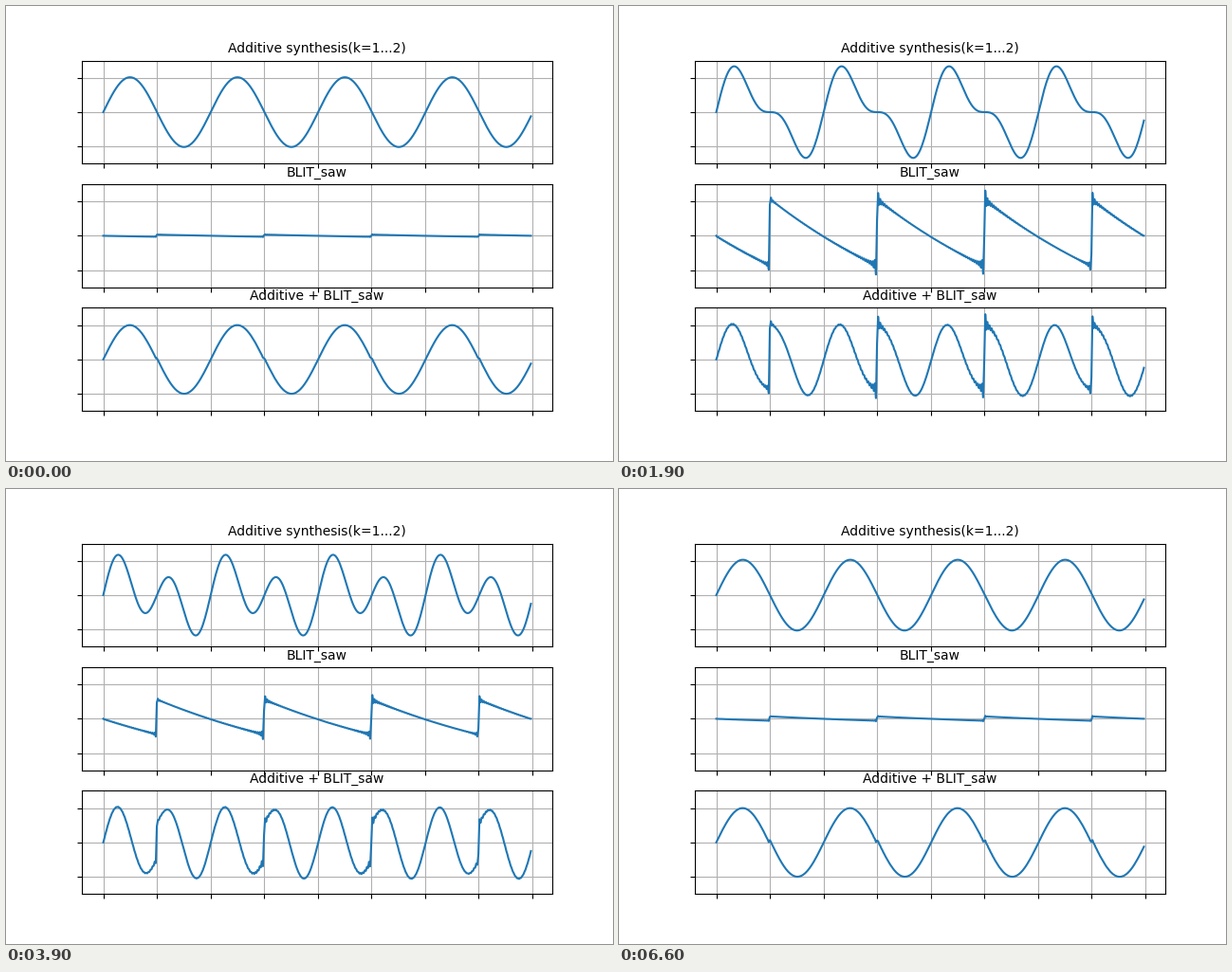
These frames come from a looping animation (640x480 px, 6700 ms). A matplotlib script:

```python
import numpy as np
import matplotlib.pyplot as plt
from matplotlib.animation import FuncAnimation

RATE, FREQ, SIZE = 44100, 440, 400
LEAK = 0.995
FRAMES, INTERVAL = 67, 100

n = np.arange(SIZE)
phase = 2 * np.pi * FREQ * n / RATE


def blit_saw():
    """Unit-jump sawtooth: leaky integral of a band-limited impulse train."""
    period = RATE / FREQ
    m = 2 * int(period / 2) + 1
    x = np.pi * (n - period / 2) / period
    pulses = np.sin(m * x) / (period * np.sin(x)) - 1 / period
    out, y = np.zeros(SIZE), 0.0
    for i, p in enumerate(pulses):
        y = LEAK * y + p
        out[i] = y
    return out


SAW = blit_saw()


def sync_ratio(frame):
    """Rises from 1.01 to 2, then falls back to 1.02."""
    return min(1.01 + 0.03 * frame, 1.02 + 0.03 * (FRAMES - 1 - frame))


def waves(ratio):
    """Hard-synced sine split into two partials and a sawtooth."""
    partials = sum(
        2 * np.sinc(ratio - k) * ratio**2 / (k * (ratio + k)) * np.sin(k * phase)
        for k in (1, 2)
    )
    saw = -2 * np.sin(np.pi * ratio) * SAW
    return partials, saw, partials + saw


fig, axes = plt.subplots(3, 1, figsize=(6.4, 4.8), dpi=100)
titles = ("Additive synthesis(k=1...2)", "BLIT_saw", "Additive + BLIT_saw")
lines = []
for ax, title, wave in zip(axes, titles, waves(sync_ratio(0))):
    lines += ax.plot(n, wave, color="#1f77b4", lw=1.5)
    ax.set_title(title, fontsize=10)
    ax.set_xlim(-0.05 * (SIZE - 1), 1.05 * (SIZE - 1))
    ax.set_ylim(-1.5, 1.5)
    ax.set_xticks(range(0, SIZE + 1, 50))
    ax.set_yticks([-1, 0, 1])
    ax.tick_params(labelbottom=False, labelleft=False)
    ax.grid(True)


def update(frame):
    for line, wave in zip(lines, waves(sync_ratio(frame))):
        line.set_ydata(wave)
    return lines


anim = FuncAnimation(fig, update, frames=FRAMES, interval=INTERVAL,
                     repeat=True, repeat_delay=0)
plt.show()
```
